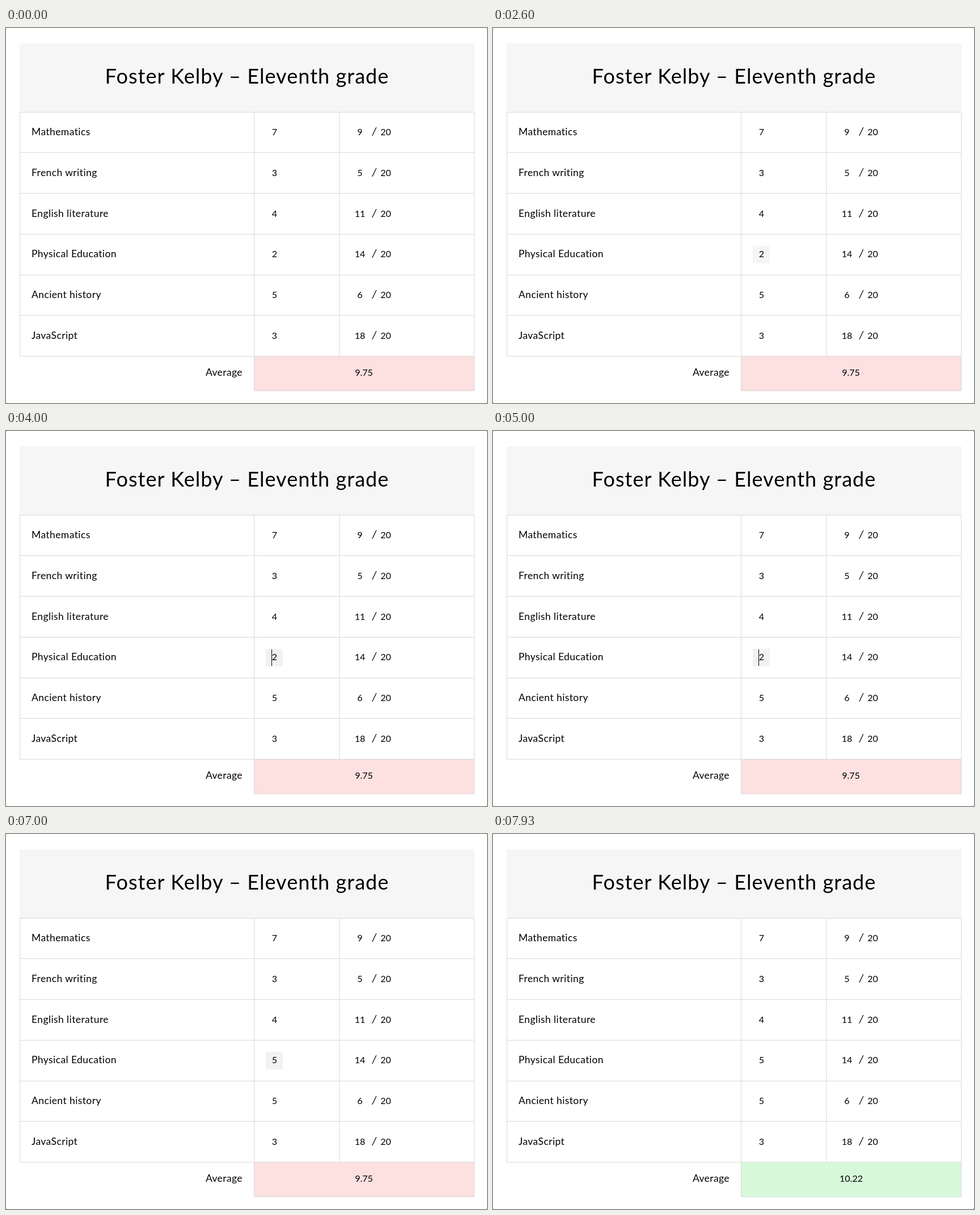
These frames come from a looping animation (848x661 px, 8000 ms). An HTML page:

```html
<!DOCTYPE html>
<html lang="en">
<head>
<meta charset="utf-8">
<title>Grades</title>
<style>
  html, body { margin: 0; width: 100%; height: 100%; overflow: hidden; background: #999; }
  svg { display: block; width: 848px; height: 661px; }
  text { font: 17.5px Lato, sans-serif; letter-spacing: .4px; fill: #000; }
  .title { font-size: 36px; letter-spacing: 1.05px; }
  .num { font-size: 16px; letter-spacing: 0; text-anchor: middle; }
  .slash { font-size: 19px; font-style: italic; text-anchor: middle; }
</style>
</head>
<body>
<svg id="stage" viewBox="0 0 848 661"></svg>
<script>
const LOOP = 8000;
const ROW = 71.75;
const LINE = '#d9d9d9';
const stage = document.getElementById('stage');

function add(tag, attrs, content = '') {
  const el = document.createElementNS('http://www.w3.org/2000/svg', tag);
  for (const name in attrs) el.setAttribute(name, attrs[name]);
  el.textContent = content;
  stage.append(el);
  return el;
}
const rect = (x, y, width, height, fill) => add('rect', { x, y, width, height, fill });
const text = (x, y, content, cls = '') => add('text', { x, y, class: cls }, content);
const num = (x, y, content) => text(x, y, content, 'num');

// Each step is [time in ms, value], held until the next step.
function hold(el, prop, steps) {
  const frames = steps.map(([time, value]) =>
    ({ offset: time / LOOP, [prop]: value, easing: 'steps(1, end)' }));
  frames.push({ offset: 1, [prop]: steps.at(-1)[1] });
  const anim = el.animate(frames, { duration: LOOP, iterations: Infinity });
  anim.startTime = document.timeline.currentTime;
}
const show = (el, ...spans) =>
  hold(el, 'opacity', [[0, 0], ...spans.flatMap(([from, to]) => [[from, 1], [to, 0]])]);
const swap = (before, after, time) => {
  hold(before, 'opacity', [[0, 1], [time, 0]]);
  hold(after, 'opacity', [[0, 0], [time, 1]]);
};

add('rect', { width: 848, height: 661, rx: 2, fill: '#fff' });
rect(24, 27, 802, 121, '#f6f6f6');
text(425, 98, 'Foster Kelby – Eleventh grade', 'title').setAttribute('text-anchor', 'middle');

// Average cell
const average = rect(437, 578, 389, 62, '#fde0e0');
hold(average, 'fill', [[0, '#fde0e0'], [7070, '#d7f9da']]);

// Grid
for (let i = 0; i <= 6; i++) rect(24, Math.floor(148 + ROW * i), 802, 1, LINE);
rect(437, 639, 389, 1, LINE);
for (const [x, bottom] of [[24, 579], [437, 640], [587.5, 579], [825, 640]])
  rect(x, 148, 1, bottom - 148, LINE);

// Edited field
const field = rect(458, 384, 30, 31, '#f5f5f5');
show(field, [2130, 7070]);
hold(field, 'fill', [[0, '#f5f5f5'], [3000, '#f2f2f2']]);
show(rect(468, 385, 11, 29, '#bbd7f7'), [5530, 6170]);

const rows = [
  ['Mathematics', 7, 9],
  ['French writing', 3, 5],
  ['English literature', 4, 11],
  ['Physical Education', 2, 14],
  ['Ancient history', 5, 6],
  ['JavaScript', 3, 18]
];
rows.forEach(([subject, weight, grade], i) => {
  const y = 189 + ROW * i;
  text(45, y, subject);
  const value = num(473.5, y, weight);
  if (weight === 2) swap(value, num(473.5, y, 5), 6170);
  num(624, y, grade);
  text(649.5, y, '/', 'slash');
  num(669.5, y, 20);
});

// Blinking caret, after and before the digit
show(rect(478, 385, 1, 29, '#000'), [2800, 3300], [6170, 6670]);
show(rect(468, 385, 1, 29, '#000'), [3800, 4300], [4800, 5300]);

text(417, 613, 'Average').setAttribute('text-anchor', 'end');
swap(num(631, 613, '9.75'), num(631.5, 613, '10.22'), 7070);
</script>
</body>
</html>
```
